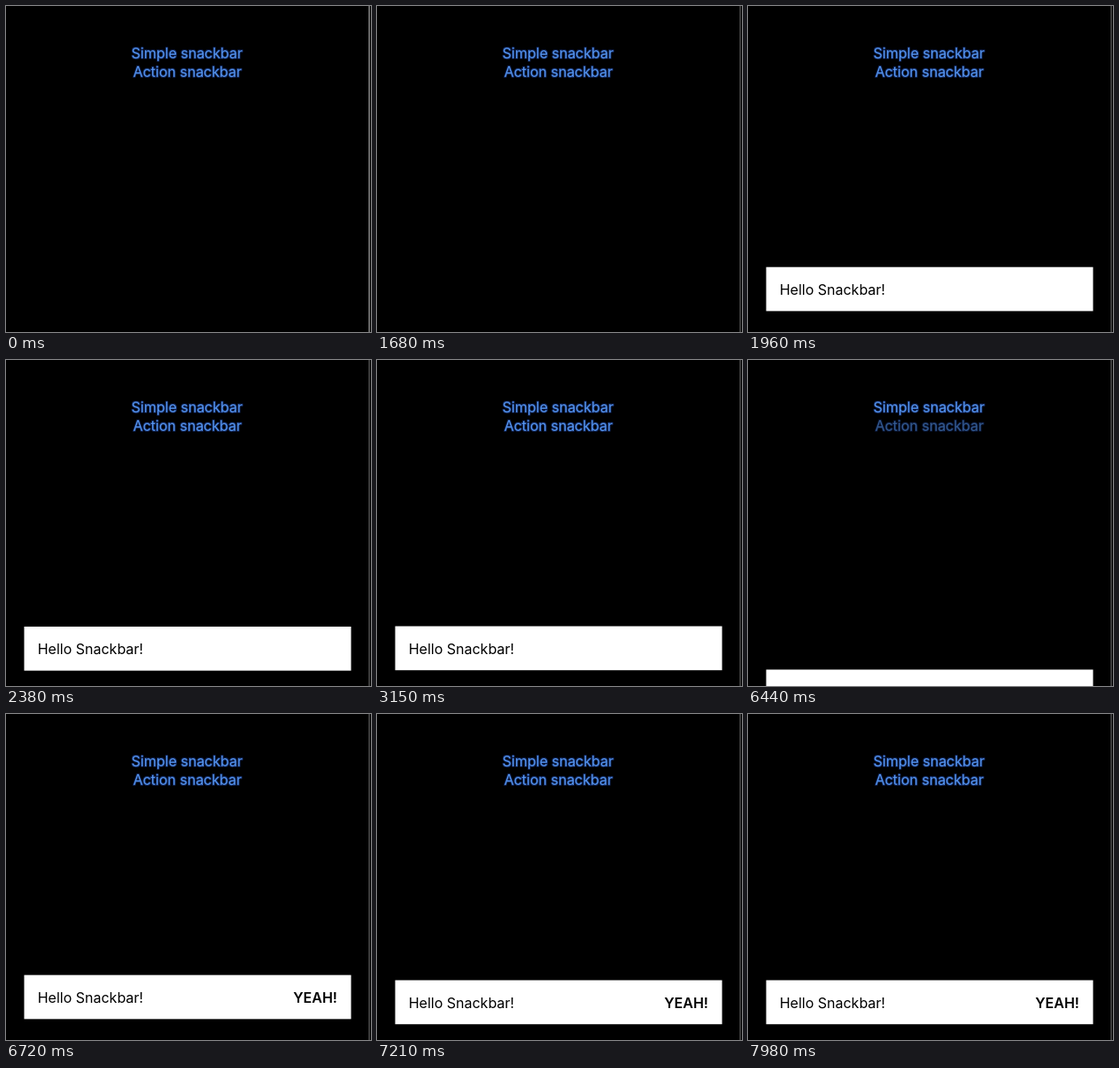
Animation of 412 by 368 pixels, one loop 8 s. Source, as an HTML page:

```html
<!DOCTYPE html>
<html lang="en">
<head>
<meta charset="utf-8">
<title>Snackbar</title>
<style>
  html, body { margin: 0; width: 100%; height: 100%; overflow: hidden; background: #000; }
  svg { display: block; width: 412px; height: 368px; }
  text { font: 16px Inter, sans-serif; }
  .link {
    fill: #5596f0; text-anchor: middle;
    stroke: #1c3c8c; stroke-opacity: 0.6; stroke-width: 2px; stroke-linejoin: round;
    paint-order: stroke;
  }
  .action { font-weight: 600; text-anchor: end; }
</style>
</head>
<body>
<svg viewBox="0 0 412 368">
  <rect width="412" height="368"/>
  <rect id="edge" x="409" width="2" height="368"/>
  <text id="simple" class="link" x="204.3" y="59">Simple snackbar</text>
  <text id="action" class="link" x="204.7" y="80">Action snackbar</text>
  <g id="bar">
    <rect x="20.5" width="369" height="49.7" fill="#fff"/>
    <text x="35.7" y="31">Hello Snackbar!</text>
    <text id="yeah" class="action" x="374" y="31">YEAH!</text>
  </g>
</svg>
<script>
  const LOOP = 8000, REST = 300.5, TRAVEL = 70;
  const SHOW_SIMPLE = 1685, HIDE = 4095, SHOW_ACTION = 6365;
  const [edge, simple, action, bar, yeah] =
    ['edge', 'simple', 'action', 'bar', 'yeah'].map(id => document.getElementById(id));
  const clamp = v => Math.min(1, Math.max(0, v));

  // Remaining share of the travel for a spring with response 0.5 s, damping 0.6
  function spring(ms) {
    if (ms <= 0) return 1;
    const s = ms / 1000, w = 4 * Math.PI, z = 0.6, d = Math.sqrt(1 - z * z);
    return Math.exp(-z * w * s) * (Math.cos(w * d * s) + z / d * Math.sin(w * d * s));
  }

  // A pressed link dims at once, then recovers
  const press = (t, at) => t < at ? 1 : 0.6 + 0.4 * clamp((t - at - 60) / 180);

  function draw(now) {
    const t = now % LOOP, second = t >= SHOW_ACTION;
    const y = REST + TRAVEL * spring(t - (second ? SHOW_ACTION : SHOW_SIMPLE));
    bar.setAttribute('transform', `translate(0 ${y.toFixed(2)})`);
    bar.setAttribute('opacity', second ? 1 : 1 - clamp((t - HIDE) / 165));
    yeah.setAttribute('visibility', second ? 'visible' : 'hidden');
    simple.setAttribute('opacity', press(t, 1720));
    action.setAttribute('opacity', press(t, 6400));
    edge.setAttribute('fill', t < 70 ? '#666' : '#3a3a3a');
  }

  const start = performance.now();
  function tick() {
    draw(performance.now() - start);
    requestAnimationFrame(tick);
  }
  tick();
</script>
</body>
</html>
```
